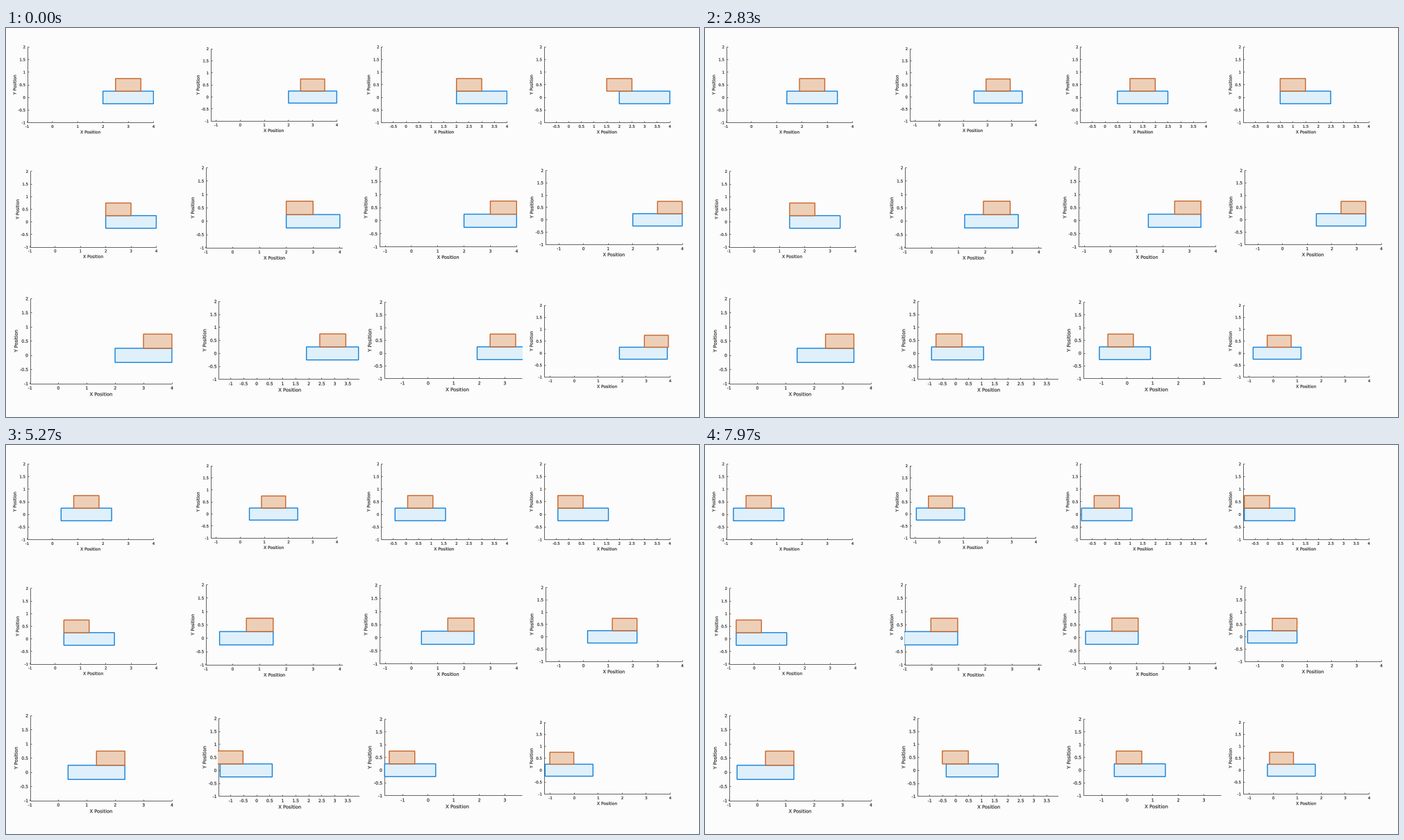
These frames come from a looping animation (998 px wide and 561 px high, 8000 ms). A matplotlib script:

```python
import numpy as np
import matplotlib.pyplot as plt
from matplotlib.animation import FuncAnimation
from matplotlib.collections import LineCollection
from matplotlib.patches import PathPatch, Rectangle
from matplotlib.path import Path
from matplotlib.textpath import TextPath
from matplotlib.transforms import Affine2D

W, H, DPI = 998, 561, 64
FRAMES, STEP = 250, 32
PT = 72 / DPI  # points per pixel

BACK = "#fcfcfd"
INK, AXIS = "#222222", "#625e59"
BLUE, BLUE_FILL = "#1482d8", "#dff0fb"
RUST, RUST_FILL = "#c8662a", "#edcfb8"

GRIP = 0.31  # deceleration of a sliding block

plt.rcParams["font.family"] = "DejaVu Sans"


# Motion: each function returns the left edge of a block at time t (seconds).

def swing(mid, amp, rate, phase=0.06):
    return lambda t: mid + amp * np.cos(rate * t + phase)


def shifted(move, gap):
    return lambda t: move(t) + gap


def rebound(lowest, turn, rate):
    """Brake evenly until the turning point, then swing back."""
    def at(t):
        s = t - turn
        if s < 0:
            return lowest + GRIP / 2 * s * s
        return lowest + GRIP / rate ** 2 * (1 - np.cos(rate * s))
    return at


def settle(t):
    """Damped spring running out below its rest point."""
    return -1.13 + 3.13 * np.exp(-0.345 * t) * (np.cos(0.195 * t) + 0.986 * np.sin(0.195 * t))


def lag(t):
    """Settling block's rider, left behind by half a unit."""
    u = min(t / 1.8, 1)
    return settle(t) + 0.5 * u * (2 - u)


def thrown_low(t):
    if t < 3.3:
        return 2 + 0.289 * t - 0.1115 * t * t - 0.0645 * t ** 2.3
    return -1.03 + 0.045 * max(8.2 - t, 0) ** 2.3


def thrown_high(t):
    return thrown_low(t) + min(0.0645 * t ** 2.3, 1)


short = swing(0.5, 1.5, 0.308)
wide = swing(0, 2, 0.2515)
deep = swing(-0.5, 2.5, 0.2365)

fig = plt.figure(figsize=(W / DPI, H / DPI), dpi=DPI, facecolor=BACK)
ax = fig.add_axes([0, 0, 1, 1])
ax.set(xlim=(0, W), ylim=(H, 0))
ax.axis("off")

glyphs, lines, blocks = [], [], []


def crisp(v):
    """Centre of the pixel that holds v."""
    return np.floor(v) + 0.5


def put(text, x, y, size, align=0.5, turn=0):
    path = TextPath((0, 0), text, size=size)
    box = path.get_extents()
    place = (Affine2D().translate(-box.x0 - align * box.width, -0.36 * size)
             .scale(1, -1).rotate_deg(turn).translate(x, y))
    glyphs.append(place.transform_path(path))


def add_block(move, width, y, zero, unit, edge, fill, clip):
    block = Rectangle((0, y), width * unit, unit / 2, fc=fill, ec=edge,
                      lw=1.4 * PT, joinstyle="miter", snap=False, zorder=2)
    ax.add_patch(block)
    block.set_clip_path(clip)
    blocks.append((block, move, zero, unit))


def add_panel(left, top, width, lo, low, high, step=1, right=None):
    """Plot from x = lo to 4 in the given width; right moves the cut of the axis."""
    unit = width / (4 - lo)
    zero, base = left - lo * unit, top + 3 * unit
    full = left + width
    right = right or full
    size = 0.0328 * width
    tick = size / 1.1

    axis_x, axis_y = crisp(left + 0.5), crisp(base)
    lines.append([(axis_x, top), (axis_x, axis_y)])
    lines.append([(axis_x, axis_y), (right, axis_y)])
    for v in np.arange(np.ceil(lo / step) * step, 4.01, step):
        x = zero + v * unit
        if x < right + 1:
            lines.append([(crisp(x), axis_y), (crisp(x), axis_y - 2)])
            put(f"{v:g}", x, base + tick, tick)
    for v in np.arange(-1, 2.01, 0.5):
        y = base - (v + 1) * unit
        lines.append([(axis_x, crisp(y)), (axis_x + 2, crisp(y))])
        put(f"{v:g}", left - 3, y, tick, align=1)
    put("X Position", (left + max(right, full)) / 2, base + 2.25 * size, size)
    put("Y Position", left - 3 * size, (top + base) / 2, size, turn=-90)

    clip = Rectangle((left - 0.7, top), right - left + 1.4, base - top,
                     transform=ax.transData)
    add_block(low, 2, base - 1.25 * unit, zero, unit, BLUE, BLUE_FILL, clip)
    add_block(high, 1, base - 1.75 * unit, zero, unit, RUST, RUST_FILL, clip)


add_panel(30.5, 27.4, 182, -1, short, shifted(short, 0.5))
add_panel(294.5, 30, 182, -1.23, wide, shifted(wide, 0.5))
add_panel(540, 27.4, 181.5, -0.99, settle, lag, step=0.5)
add_panel(774.5, 27.4, 181.5, -0.99, settle, shifted(lag, -0.5), step=0.5)

add_panel(34.5, 206.9, 182, -1, short, short)
add_panel(287.8, 201.5, 193, -1, thrown_low, thrown_high, right=485)
add_panel(537.5, 202.2, 198, -1.225, wide, shifted(wide, 1))
add_panel(776.5, 205.5, 197.5, -1.55, deep, shifted(deep, 1))

add_panel(34.5, 390.3, 204.5, -1, short, shifted(short, 1))
add_panel(306, 394.3, 205, -1.467, rebound(-1.455, 4.66, 0.68),
          rebound(-1.53, 5.05, 0.6), step=0.5, right=509)
add_panel(544.5, 395.4, 210.7, -1.725, rebound(-1.73, 4.85, 0.5),
          rebound(-1.53, 5.05, 0.5), right=743.5)
add_panel(774.5, 400, 182, -1.275, rebound(-1.3, 4.53, 0.73),
          rebound(-1.03, 5.05, 0.75))

ax.add_collection(LineCollection(lines, colors=AXIS, linewidths=0.95 * PT,
                                 snap=False, zorder=1), autolim=False)
ax.add_patch(PathPatch(Path.make_compound_path(*glyphs), fc=INK, ec=INK,
                       lw=0.15 * PT, zorder=3))


def update(i):
    t = i * STEP / 1000
    for block, move, zero, unit in blocks:
        block.set_x(zero + unit * move(t))
    return [b[0] for b in blocks]


def reset():
    return update(0)


anim = FuncAnimation(fig, update, frames=FRAMES, init_func=reset,
                     interval=STEP, repeat=True, repeat_delay=0, blit=False)
plt.show()
```
